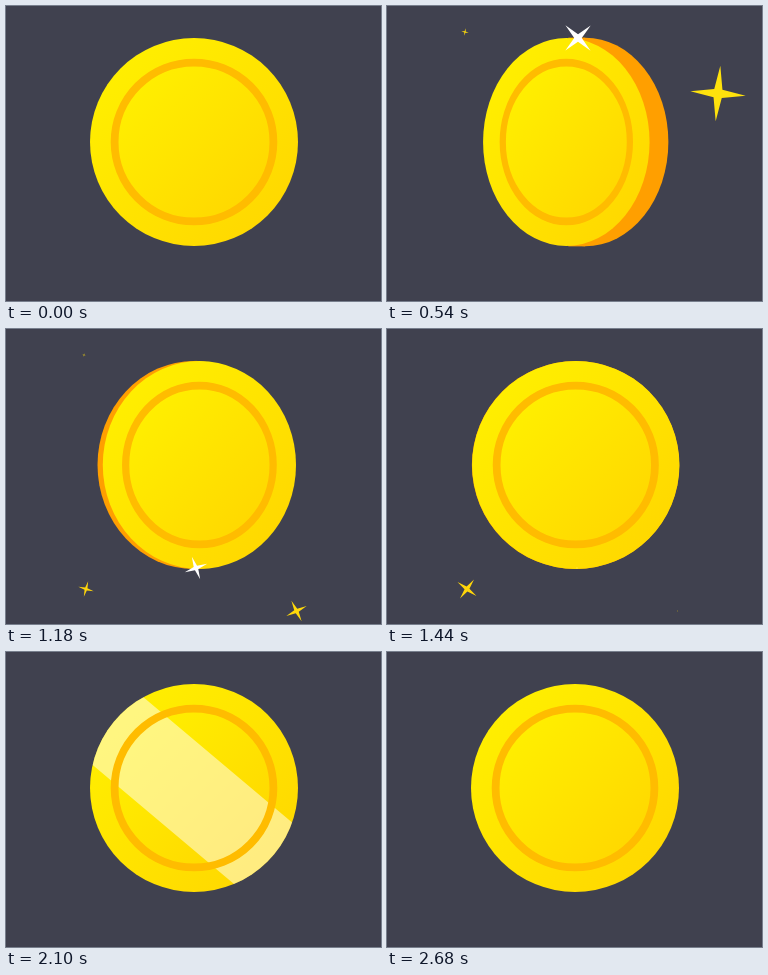
Recreate the animation shown at these times as an HTML page with a canvas. Size 375x295 px, loop 3080 ms.

```html
<!DOCTYPE html>
<html lang="en">
<head>
<meta charset="utf-8">
<title>Spinning coin</title>
<style>
html, body { margin: 0; width: 100%; height: 100%; overflow: hidden; background: #40414f; }
canvas { display: block; }
</style>
</head>
<body>
<canvas id="stage" width="375" height="295"></canvas>
<script>
const ctx = document.getElementById('stage').getContext('2d');
const LOOP = 3080, CX = 188, CY = 136, R = 104;
const EDGE_ON = 766, SPIN_END = 1760;
const SHINE_START = 1906, SHINE_TIME = 387;
const SPARK_TIME = 760;

// x, y, start time, peak radius, turn in degrees, colour
const sparks = [
  [191, 32, 0, 31, 190, '#fff'],
  [331, 87.5, 175, 28.8, 10, '#ffe20c'],
  [78, 26, 460, 17.5, 102, '#ffdc0a'],
  [190, 239, 700, 16.3, 110, '#fff'],
  [290.5, 282, 700, 15.5, 100, '#ffd90a'],
  [80, 260, 980, 15, 60, '#ffd60a']
];

function disc(r) {
  ctx.beginPath();
  ctx.arc(0, 0, r, 0, 2 * Math.PI);
}

function gold(r) {
  const g = ctx.createLinearGradient(-r * .7, -r * .7, r * .7, r * .7);
  g.addColorStop(0, '#ffee00');
  g.addColorStop(1, '#ffd900');
  return g;
}

// Tilt away from face-on in radians; grows to a quarter turn, then shrinks.
function tilt(t) {
  if (t < EDGE_ON) return Math.PI / 2 * (t / EDGE_ON) ** 2.57;
  if (t < SPIN_END) return Math.PI / 2 * ((SPIN_END - t) / (SPIN_END - EDGE_ON)) ** 2.63;
  return 0;
}

function drawShine(t) {
  const u = (t - SHINE_START) / SHINE_TIME;
  if (u < 0 || u >= 2) return;
  ctx.save();
  disc(R);
  ctx.clip();
  ctx.rotate(40.1 * Math.PI / 180);
  ctx.fillStyle = 'rgba(255,255,255,.5)';
  ctx.fillRect(-150, -189 + 302 * (u % 1), 300, 84.5);
  ctx.restore();
}

function drawCoin(t) {
  const a = tilt(t), s = Math.sin(a), width = Math.cos(a);
  const first = t < EDGE_ON, side = first ? -1 : 1;
  const thick = 38.5 * s ** (first ? 1.4 : 2);
  const faceX = CX + side * 18.7 * s ** (first ? 1.5 : 1.25);
  const backX = faceX - side * thick;
  const ry = R + 1.6 * s ** 3;

  if (s > .001) {
    ctx.fillStyle = '#ff9f00';
    ctx.beginPath();
    ctx.ellipse(backX, CY, R * width, ry, 0, 0, 2 * Math.PI);
    ctx.fill();
    ctx.fillRect(backX, CY - ry, side * Math.max(0, thick - 2), 2 * ry);
  }

  ctx.save();
  ctx.translate(faceX, CY);
  ctx.scale(Math.max(width, .001), 1);
  ctx.fillStyle = gold(R);
  disc(R);
  ctx.fill();
  ctx.fillStyle = gold(76);
  disc(79);
  ctx.fill();
  drawShine(t);
  ctx.strokeStyle = '#ffbc00';
  ctx.lineWidth = 7.8;
  disc(79.4);
  ctx.stroke();
  ctx.restore();
}

function drawSpark(t, [x, y, start, peak, turn, color]) {
  const u = (t - start) / SPARK_TIME;
  if (u <= 0 || u >= 1) return;
  const r = peak * (1 - Math.abs(2 * u - 1));
  ctx.fillStyle = color;
  ctx.beginPath();
  for (let i = 0; i < 8; i++) {
    const a = i * Math.PI / 4 + turn * u * Math.PI / 180;
    const d = i % 2 ? r * .21 : r;
    ctx.lineTo(x + d * Math.cos(a), y + d * Math.sin(a));
  }
  ctx.fill();
}

const began = performance.now();
function frame() {
  const t = (performance.now() - began) % LOOP;
  ctx.fillStyle = '#40414f';
  ctx.fillRect(0, 0, 375, 295);
  drawCoin(t);
  sparks.forEach(spark => drawSpark(t, spark));
  requestAnimationFrame(frame);
}
frame();
</script>
</body>
</html>
```
